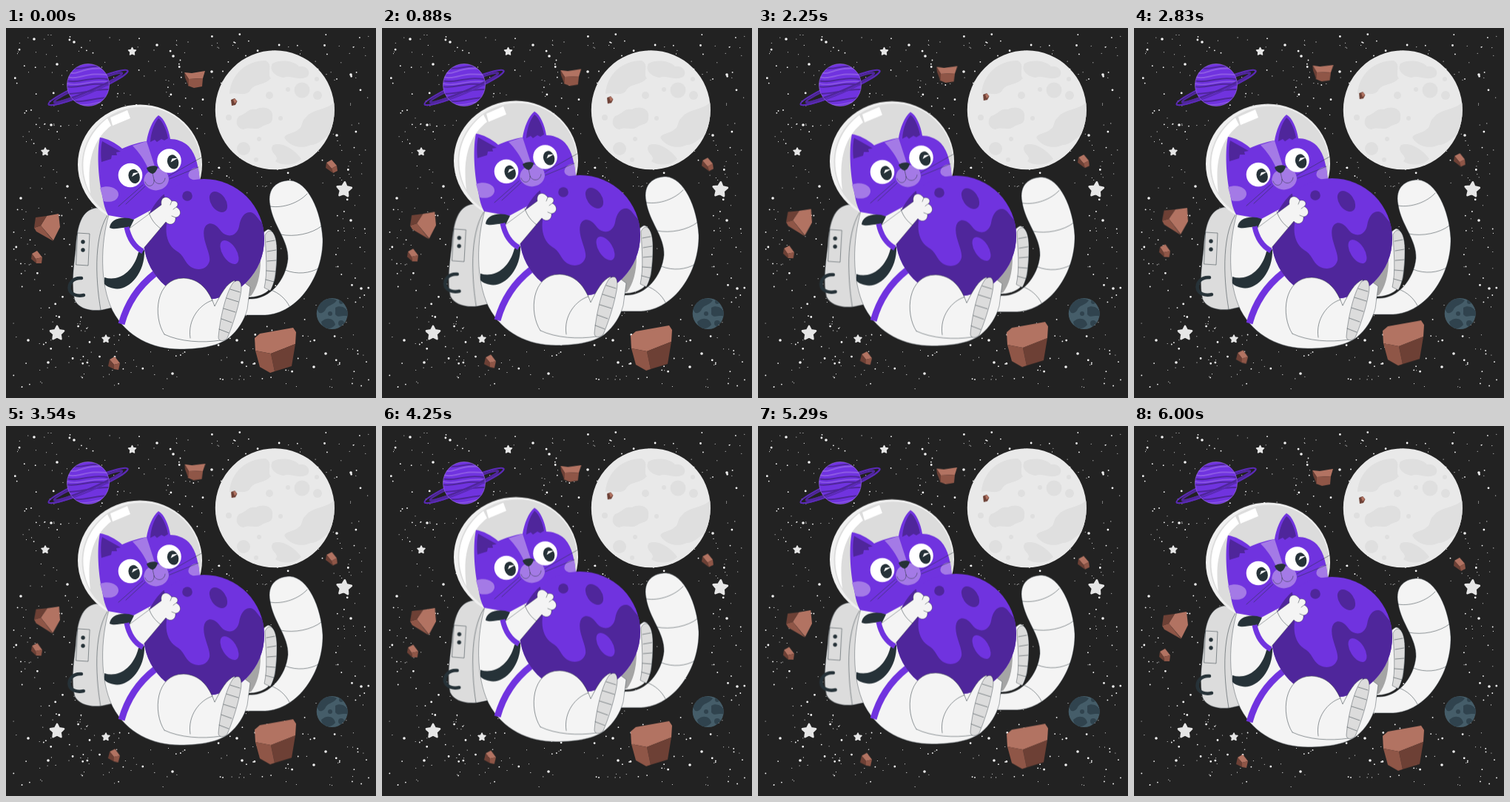
Animation of 500 by 500 pixels, one loop 6040 ms. Source, as an HTML page:

```html
<!DOCTYPE html>
<html lang="en">
<head>
<meta charset="utf-8">
<title>Space cat</title>
<style>
html, body { margin: 0; width: 100%; height: 100%; overflow: hidden; background: #222; }
svg { display: block; width: 100vw; height: 100vh; }
.dots { stroke: #f5f5f5; stroke-linecap: round; fill: none; }
.star { fill: #e6e6e6; }
.line { fill: none; stroke: #263238; stroke-width: .5; stroke-linecap: round; }
.suit { fill: #f4f4f4; stroke: #263238; stroke-width: .4; stroke-linejoin: round; }
.grey { fill: #dcdcdc; stroke: #263238; stroke-width: .4; }
.ink { fill: #263238; }
.strap { fill: none; stroke: #263238; }
.band { fill: none; stroke: #7033df; }
.violet { fill: #7033df; }
.deep { fill: #4f269b; }
.pale { fill: #a47ae6; }
.lit { fill: #b27362; }
.mid { fill: #8f5647; }
.dim { fill: #6d4035; }

.rock { transform-box: fill-box; transform-origin: center; animation: drift 3020ms linear infinite alternate; }
.big { --rise: -10.5px; --turn: 0deg; }
#cat { animation: bob 1510ms cubic-bezier(.3, .2, .7, .8) infinite alternate; }
#pack { transform-origin: 115px 318px; animation: sway 1510ms ease-in-out infinite alternate; }
@keyframes drift { to { transform: translateY(var(--rise, -9.3px)) rotate(var(--turn, 3deg)); } }
@keyframes bob { to { transform: translateY(-8.8px); } }
@keyframes sway { to { transform: rotate(1deg); } }
</style>
</head>
<body>
<svg viewBox="0 0 500 500">
  <defs>
    <clipPath id="ringed"><circle cx="111" cy="77" r="28.5"/></clipPath>
    <clipPath id="moon"><circle cx="363.3" cy="110.8" r="80.5"/></clipPath>
    <clipPath id="blue"><circle cx="440.7" cy="386" r="21"/></clipPath>
    <clipPath id="ball"><circle cx="267.5" cy="285.5" r="81.5"/></clipPath>
    <path id="s" d="M0-10 3-4 10-3 5 2 6 9 0 6-6 9-5 2-10-3-3-4Z" stroke-linejoin="round" stroke="#e6e6e6" stroke-width="3"/>
  </defs>
  <rect width="500" height="500" fill="#222"/>
  <g id="sky"></g>
  <g class="star">
    <use href="#s" transform="translate(170.5 31.5) scale(.5)"/>
    <use href="#s" transform="translate(53 167) scale(.5)"/>
    <use href="#s" transform="translate(457 218) rotate(5) scale(.95)"/>
    <use href="#s" transform="translate(69 412) scale(.9)"/>
    <use href="#s" transform="translate(135 420) scale(.5)"/>
  </g>

  <!-- ringed planet -->
  <g>
    <g transform="rotate(-23 111 80.5)" fill="none">
      <ellipse cx="111" cy="80.5" rx="58" ry="7.500" stroke="#5a2ab5" stroke-width="2.200"/>
      <ellipse cx="111" cy="80.5" rx="50" ry="4.800" stroke="#4f269b" stroke-width="2.500"/>
    </g>
    <circle class="violet" cx="111" cy="77" r="28.500"/>
    <g clip-path="url(#ringed)" fill="none" stroke="#4f269b" stroke-width="2">
      <path d="M85 60C96 65 108 50 139 56M82 66C98 71 110 58 141 64" stroke="#8c59e4"/>
      <path d="M88 54C103 58 113 49 132 52M81 71C99 76 113 64 142 70M81 79C98 83 112 72 142 77"/>
      <path d="M82 89C101 90 116 82 142 83M88 99C106 101 121 94 139 94"/>
      <path d="M82 75C101 80 113 69 142 73M92 103C108 106 120 101 134 99" stroke="#8c59e4" stroke-width="1.300"/>
    </g>
    <g transform="rotate(-23 111 80.5)" fill="none">
      <path d="M53 80.5A58 7.500 0 0 0 169 80.5" stroke="#5a2ab5" stroke-width="2.200"/>
      <path d="M61 80.5A50 4.800 0 0 0 161 80.5" stroke="#4f269b" stroke-width="2.500"/>
    </g>
    <circle cx="111" cy="77" r="28.500" fill="none" stroke="#9d70e5" stroke-width=".6"/>
  </g>

  <!-- moon -->
  <circle cx="363.300" cy="110.800" r="80.500" fill="#e9e9e9"/>
  <g clip-path="url(#moon)" fill="#dfdfdf">
    <path d="M302 89C304 62 325 44 351 44C362 50 352 61 358 68C346 80 336 73 329 86C321 93 312 86 302 89Z"/>
    <path d="M315 119C325 116 327 108 338 110C349 104 362 110 360 120C361 132 350 129 345 134C337 139 329 133 321 137C311 136 309 125 315 119Z"/>
    <path d="M360 48C371 42 389 44 396 52C407 50 413 60 407 66C394 72 385 63 375 67C366 66 354 58 360 48Z"/>
    <path d="M405 121C414 109 434 111 444 100L444 141C430 146 424 158 412 158C399 164 385 160 378 151C371 143 390 143 395 137C402 133 398 127 405 121Z"/>
    <path d="M361 158C374 153 392 166 399 177C391 186 373 187 364 180C372 173 353 168 361 158Z"/>
    <circle cx="400" cy="84" r="10.500"/><circle cx="421" cy="91" r="6"/>
    <circle cx="321" cy="163" r="9"/><circle cx="301" cy="121" r="4"/>
    <circle cx="356" cy="91" r="5"/><circle cx="371" cy="122" r="3"/><circle cx="342" cy="150" r="3"/>
    <circle cx="381" cy="83" r="3"/><circle cx="420" cy="69" r="3"/><circle cx="338" cy="178" r="3"/>
  </g>

  <!-- small blue planet -->
  <circle cx="440.700" cy="386" r="21" fill="#455d69"/>
  <g clip-path="url(#blue)" fill="#30434e">
    <path d="M420 378C427 365 440 363 447 368C442 376 434 373 431 382C426 387 422 387 420 378Z"/>
    <path d="M445 378C452 373 464 379 463 390C455 387 449 393 445 387ZM426 397C434 389 444 393 445 401C438 410 427 406 426 397Z"/>
    <circle cx="453" cy="399" r="4"/><circle cx="438" cy="386" r="3"/><circle cx="453" cy="370" r="3"/>
  </g>

  <!-- asteroids -->
  <g class="rock">
    <path class="lit" d="M241 60 251 61 269 58 266 68 247 69Z"/>
    <path class="mid" d="M247 69 266 68 265 79 254 81 246 78Z"/>
    <path class="dim" d="M241 60 247 69 247 79 242 67Z"/>
  </g>
  <g class="rock">
    <path class="dim" d="M304 97 309 95 312.500 99 310 104 305 105Z"/>
    <path class="lit" d="M307 97 309 95.500 312 99 309 102Z"/>
  </g>
  <g class="rock">
    <path class="lit" d="M433 182 440 178 447 186 440 190Z"/>
    <path class="mid" d="M440 190 447 186 448 193 442 196Z"/>
    <path class="dim" d="M433 182 440 190 442 196 432 189Z"/>
  </g>
  <g class="rock">
    <path class="lit" d="M55 254 71 251 73 269 64 287 47 267Z"/>
    <path class="mid" d="M38 270 47 267 64 288 41 275Z"/>
    <path class="dim" d="M40 256 55 254 47 267 38 270Z"/>
  </g>
  <g class="rock">
    <path class="lit" d="M35 305 42 301 49 310 40 312Z"/>
    <path class="mid" d="M40 312 49 310 48 318 41 318Z"/>
    <path class="dim" d="M35 305 40 312 41 318 34 312Z"/>
  </g>
  <g class="rock">
    <path class="lit" d="M140 448 147 444 154 453 146 455Z"/>
    <path class="mid" d="M146 455 154 453 152 462 146 461Z"/>
    <path class="dim" d="M140 448 146 455 146 461 138 457Z"/>
  </g>
  <g class="rock big">
    <path class="lit" d="M336 419 343 413 388 405 392 411 391 427 358 440 337 436Z"/>
    <path class="dim" d="M358 440 391 427 386 457 363 464Z"/>
    <path class="mid" d="M337 436 358 440 363 464 357 466 343 458Z"/>
  </g>

  <g id="cat">
    <!-- tail and far leg -->
    <path class="suit" d="M357 240C352 215 368 206 384 206C408 208 426 247 428 285C429 335 395 386 350 388L316 388 328 366C355 368 378 342 381 312C382 287 361 267 357 240Z"/>
    <path class="line" d="M357 241C375 244 396 236 407 224M371 279C390 283 413 278 426 268M377 327C394 334 411 331 422 325M358 354C369 358 378 366 383 376"/>
    <path class="suit" d="M335 292C343 284 347 275 354 272C366 272 368 307 364 335C362 352 350 364 326 364Z"/>
    <path class="grey" d="M350 280C357 267 366 277 366 300C366 325 363 347 357 355L349 351C354 330 351 302 350 280Z"/>
    <path class="line" d="M352 289 363 287M353 302 365 300M353 315 365 314M352 328 364 329M351 340 362 343"/>
    <path d="M344 314C344 335 339 352 331 362L316 362 324 330Z" fill="#a5a5a5"/>

    <!-- backpack -->
    <g id="pack">
      <path class="grey" d="M122 243C102 246 96 266 94 300C91 325 88 350 93 368C99 380 115 383 130 381L152 376 154 250Z"/>
      <path class="line" d="M140 249C119 275 120 335 128 381M97 277 113 278 111 321 95 320Z"/>
      <circle class="ink" cx="104" cy="289" r="2.700"/><circle class="ink" cx="104" cy="300" r="2.700"/>
      <path class="strap" stroke-width="4.500" stroke-linecap="round" d="M102 338C91 337 84 345 86 354C88 360 96 363 105 361"/>
    </g>

    <!-- helmet -->
    <ellipse cx="181" cy="184.500" rx="84" ry="81" fill="#f0f0f0"/>
    <ellipse cx="183" cy="185.500" rx="80.500" ry="79" fill="#dcdcdc"/>
    <path fill="#fff" d="M114 224C95 187 105 147 137 122L142 132C116 152 109 184 114 224ZM141 121 164 111 168 122 144 132Z"/>

    <!-- body -->
    <path class="suit" d="M139 252C128 290 126 345 144 382C163 418 198 434 235 434C265 434 288 429 301 419C314 408 322 395 326 380L330 350 262 300 192 245Z"/>

    <g>
      <path class="violet" d="M127 148C123 165 124 200 130 226C132 238 134 246 138 253L172 259 235 225 262 206C260 190 258 172 247 160C240 153 230 150 222 150C220 137 214 122 206 118C198 124 192 140 190 153C178 155 166 159 157 163C148 155 136 149 127 148Z"/>
      <path class="deep" d="M130 153 155 167 149 168 150 172 143 172 142 177 129 181C128 171 128 160 130 153ZM206 122C199 131 196 142 195 154L201 151 204 154 210 150 214 152 219 149C217 138 212 126 206 122Z"/>
      <path class="pale" d="M171 159 190 153 201 187 192 190C187 178 179 167 171 159ZM127 216C140 211 153 217 152 226C150 235 139 236 132 234ZM247 196C250 190 255 188 260 189L262 206C253 207 244 203 247 196Z"/>
      <path class="pale" d="M187 202C189 194 197 192 203 190C212 188 220 195 220 205C219 215 208 221 199 219C190 217 184 209 187 202Z"/>
      <path class="line" d="M198 196 200 205M188 208C191 217 201 214 200 205C203 213 214 212 215 203M185 212 152 241M188 214 162 238M220 200 264 175M221 204 260 188"/>
      <path class="ink" d="M190 189C194 186 202 185 205 188C204 193 200 197 198 197C194 196 191 193 190 189Z"/>
      <g id="eye">
        <circle cx="168" cy="199" r="16.300" fill="#fff"/>
        <ellipse class="ink" cx="173" cy="200.500" rx="7.500" ry="9.800" transform="rotate(-18 173 200)"/>
        <path d="M170 201 172 196 180 195Z" fill="#fff"/>
      </g>
      <use href="#eye" x="52.500" y="-19.500"/>
    </g>

    <!-- straps -->
    <path class="band" stroke-width="9" d="M156 400C163 375 178 350 201 332"/>
    <path class="ink" d="M133 337C151 343 172 331 179 303L187 300C188 331 167 353 150 352.500C143 352 137 350 133 346Z"/>
    <path class="ink" d="M140 270C141 258 157 253 173 259L167 271C158 267 149 274 140 270Z"/>

    <!-- globe -->
    <circle class="violet" cx="267.500" cy="285.500" r="81.500"/>
    <g clip-path="url(#ball)">
      <path class="deep" d="M184 220 214 225 217 265C215 280 219 294 230 301C240 306 242 318 250 323C260 329 272 326 275 315C277 304 264 286 268 271C272 260 283 263 291 275C299 284 312 282 315 268C317 255 323 248 331 249C339 251 341 262 352 268L352 370 184 370Z"/>
      <circle class="deep" cx="245" cy="227" r="6.800"/>
      <ellipse class="deep" cx="287" cy="235" rx="10" ry="15.500" transform="rotate(-35 287 235)"/>
      <ellipse class="violet" cx="302" cy="303" rx="9.500" ry="18" transform="rotate(-32 302 303)"/>
    </g>

    <!-- arm -->
    <path class="suit" d="M164 273 210 239C208 228 218 225 224 234C232 232 234 239 230 242C238 246 237 255 229 256C230 265 221 268 216 262L184 300C172 296 165 285 164 273Z"/>
    <path class="line" d="M193 249C196 259 202 266 209 271M224 234 222 239M230 242 226 245M229 256 224 254"/>
    <path class="band" stroke-width="7" d="M163 269C166 284 174 296 185 302"/>

    <!-- near leg -->
    <path fill="#f4f4f4" d="M214 414C198 390 202 338 240 338C262 339 274 354 282 376C290 360 298 345 309 341L299 418C270 426 235 426 214 414Z"/>
    <path class="line" d="M214 414C198 390 202 338 240 338C262 339 274 354 282 376C290 360 298 345 309 341M279 368C262 373 245 394 249 419M214 414C235 424 265 426 290 422"/>
    <path class="grey" d="M287 418C289 395 296 360 307 344C316 337 320 345 317 360C313 382 305 405 299 419C295 424 287 424 287 418Z"/>
    <path class="line" d="M303 353 316 357M298 365 314 370M294 379 310 384M291 393 305 398M288 407 301 412"/>
  </g>
</svg>
<script>
// Seeded star field: a few places for the large dots, random ones for the dust.
let seed = 29;
const rand = () => (seed = seed * 16807 % 2147483647) / 2147483647;
const addDots = (points, width) => {
  const path = document.createElementNS("http://www.w3.org/2000/svg", "path");
  path.setAttribute("class", "dots");
  path.setAttribute("stroke-width", width);
  path.setAttribute("d", points.map(([x, y]) => `M${x.toFixed(1)} ${y.toFixed(1)}h.01`).join(""));
  document.getElementById("sky").append(path);
};
const scatter = n => Array.from({ length: n }, () => [10 + rand() * 480, 8 + rand() * 480]);

addDots(scatter(480), 1.1);
addDots(scatter(220), 1.8);
addDots(scatter(75), 2.8);
addDots([[38, 15], [92, 19], [69, 49], [61, 131], [226, 38], [204, 23], [278, 59], [466, 63],
  [447, 145], [20, 230], [83, 214], [466, 260], [30, 422], [57, 452], [312, 422], [319, 452],
  [416, 458], [225, 467], [432, 440], [480, 352]], 3.6);
</script>
</body>
</html>
```
